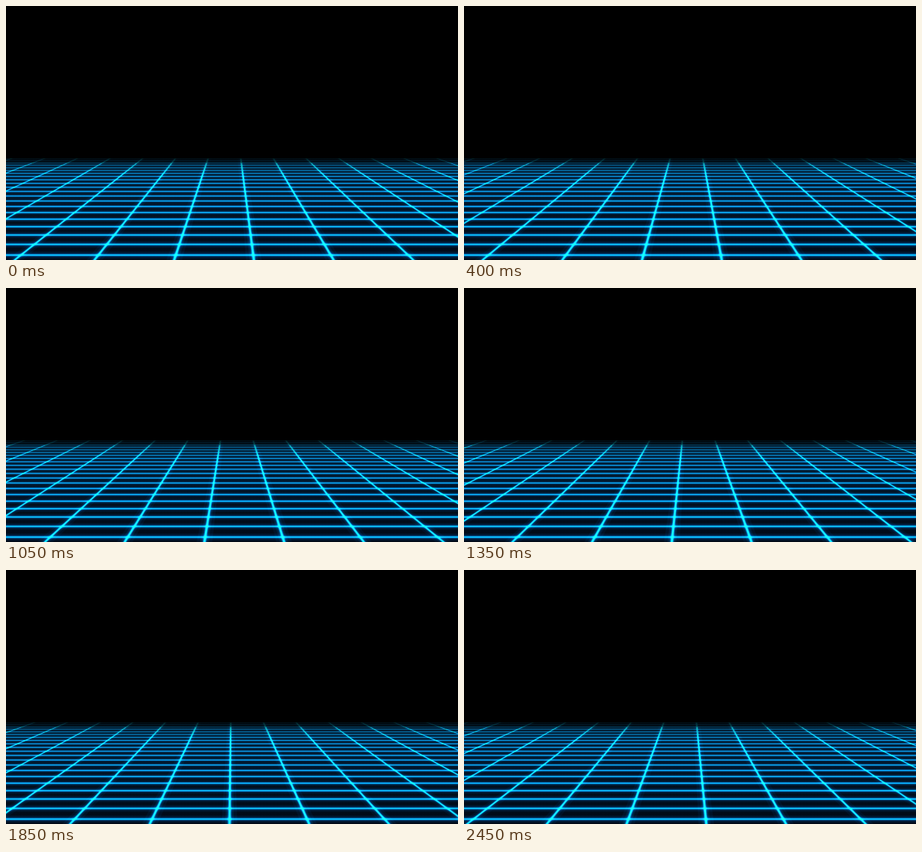
Recreate the animation shown at these times as an HTML page with a canvas. Size 640 px wide and 360 px high, loop 2.5 s.

```html
<!DOCTYPE html>
<html lang="en">
<head>
<meta charset="utf-8">
<title>Neon grid</title>
<style>
  html, body { margin: 0; height: 100%; overflow: hidden; background: #000; }
  canvas { display: block; }
</style>
</head>
<body>
<canvas id="stage" width="640" height="360"></canvas>
<script>
const ctx = document.getElementById('stage').getContext('2d');
const W = 640, H = 360, LOOP = 2500, STEP = 50;
const TOP = 216;                      // far edge of the floor
const VX = 319.5, VY = 116;           // vanishing point
const GAP = 112.9;                    // column spacing at the bottom edge
const SPEED = 0.0444, RAMP = 170;     // drift in px/ms, soft start in ms

// Width at the bottom edge and colour of each layer, glow first
const COLUMN = [
  [22, 'rgba(0,70,130,.10)'],
  [12, 'rgba(0,90,150,.16)'],
  [7, 'rgba(0,120,180,.30)'],
  [4.2, 'rgba(8,150,205,.55)'],
  [2.4, 'rgba(22,150,175,.75)']
];
const ROW = [
  [10, 'rgba(0,60,115,.18)'],
  [5.5, 'rgba(0,85,145,.32)'],
  [3.2, 'rgba(4,120,175,.5)'],
  [1.7, 'rgba(12,130,170,.75)']
];

const depth = y => (y - VY) / (H - VY);

function fade(y0, y1, stops) {
  const g = ctx.createLinearGradient(0, y0, 0, y1);
  stops.forEach(([at, color]) => g.addColorStop(at, color));
  ctx.fillStyle = g;
  ctx.fillRect(0, y0, W, y1 - y0);
}

function column(x) {
  const far = depth(TOP), center = VX + (x - VX) * far;
  for (const [width, color] of COLUMN) {
    const a = width / 2, b = a * far;
    ctx.fillStyle = color;
    ctx.beginPath();
    ctx.moveTo(center - b, TOP);
    ctx.lineTo(center + b, TOP);
    ctx.lineTo(x + a, H);
    ctx.lineTo(x - a, H);
    ctx.fill();
  }
}

function row(y) {
  const s = depth(y);
  ctx.globalAlpha = Math.min(1, 0.35 + 0.75 * s);
  for (const [width, color] of ROW) {
    const h = width * s;
    ctx.fillStyle = color;
    ctx.fillRect(0, y - h / 2, W, h);
  }
  ctx.globalAlpha = 1;
}

function drift(t) {
  return SPEED * (t < RAMP ? t * t / (2 * RAMP) : t - RAMP / 2);
}

function draw(t) {
  ctx.globalCompositeOperation = 'source-over';
  ctx.fillStyle = '#000';
  ctx.fillRect(0, 0, W, H);
  fade(TOP, H, [[0, '#02101c'], [0.3, '#021220'], [1, '#010a18']]);

  ctx.globalCompositeOperation = 'lighter';
  for (let k = 0; k <= 20; k++) row(VY + 1 / (0.004219 + 0.000288 * k));
  const x = 351 + drift(t);
  for (let k = -9; k <= 7; k++) column(x + k * GAP);

  // Haze at the far edge
  ctx.globalCompositeOperation = 'source-over';
  fade(0, TOP, [[0, '#000'], [1, '#000']]);
  fade(TOP, 240, [
    [0, 'rgba(0,0,0,.85)'], [0.22, 'rgba(0,0,0,.72)'],
    [0.32, 'rgba(0,0,0,.3)'], [1, 'rgba(0,0,0,0)']
  ]);
}

function tick() {
  const t = performance.now() % LOOP;
  draw(Math.floor(t / STEP) * STEP);
  requestAnimationFrame(tick);
}
tick();
</script>
</body>
</html>
```
